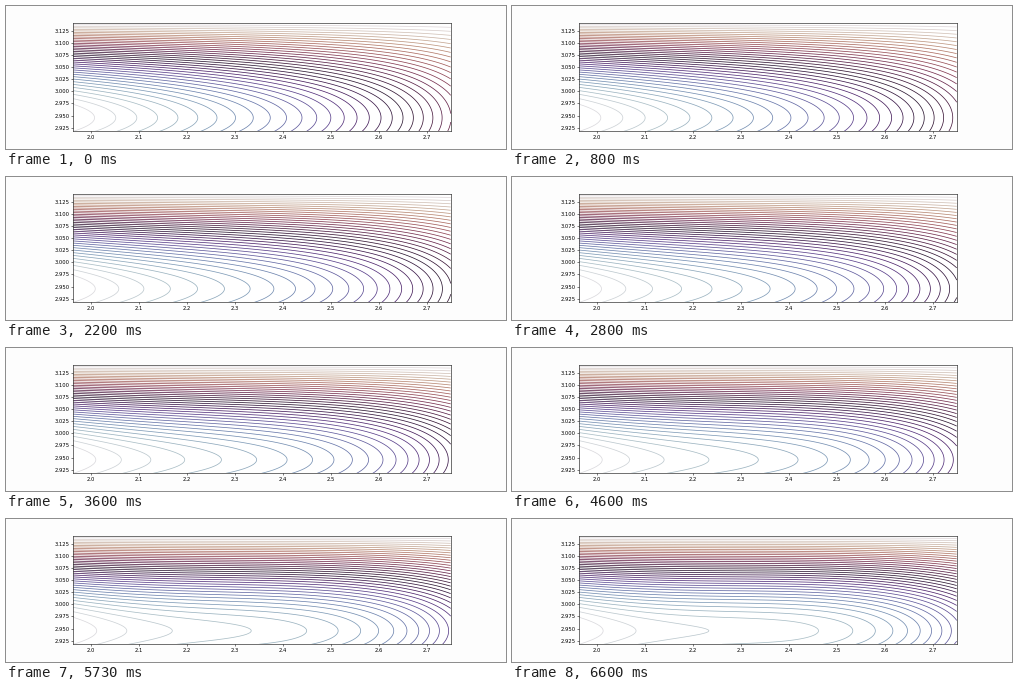
A matplotlib script that plays this animation: 500x143 px, repeating every 6.67 s.

```python
import numpy as np
import matplotlib.pyplot as plt
from matplotlib.animation import FuncAnimation

W, H, DPI = 500, 143, 64
FRAMES, LOOP = 100, 6670
PX = 72 / DPI  # points per pixel
LEVELS = 40

X0, X1 = 5 * np.pi / 8, 7 * np.pi / 8
Y0, Y1 = 13 * np.pi / 14, np.pi
BOX = (67.3, 17.7, 377.4, 108.0)  # left, bottom, width, height in pixels

x = np.linspace(X0, X1, 240)
y = np.linspace(Y0, Y1, 120)
v = (x - X0) / (X1 - X0)
wave = np.sin(8 * y)[:, None]  # trough of -1, back to 0 at pi

# slightly muted cyclic colours, one per level
heights = np.linspace(0, 1, LEVELS + 1)
rgb = plt.get_cmap("twilight")(heights)[:, :3]
grey = rgb @ [[0.3], [0.59], [0.11]]
colors = 0.75 * rgb + 0.25 * grey


def surface(t):
    """Valley along x that flattens in the middle as t goes from 0 to 1."""
    rise = 0.047 * v + 0.067 * v**3.5 / 3.5
    dip = 0.052 * t * (1 - np.cos(np.pi * v)) / np.pi
    floor = (rise - dip) * BOX[2] / LEVELS
    return 1 + (1 - floor) * wave


fig = plt.figure(figsize=(W / DPI, H / DPI), dpi=DPI, facecolor="#fdfdfd")
ax = fig.add_axes([BOX[0] / W, BOX[1] / H, BOX[2] / W, BOX[3] / H])
ax.set_xlim(X0, X1)
ax.set_ylim(Y0, Y1)
ax.set_xticks(np.arange(2.0, 2.75, 0.1))
ax.set_yticks(np.arange(2.925, 3.13, 0.025))
ax.xaxis.set_major_formatter("{x:.1f}")
ax.yaxis.set_major_formatter("{x:.3f}")
ax.tick_params(labelsize=5.2 * PX, length=1.8 * PX, width=0.5 * PX, pad=1.6 * PX)
for spine in ax.spines.values():
    spine.set_linewidth(0.55 * PX)

lines = None


def draw(i):
    global lines
    if lines is not None:
        lines.remove()
    lines = ax.contour(x, y, surface(i / (FRAMES - 1)), levels=heights,
                       colors=colors, linewidths=0.75 * PX)
    return [lines]


anim = FuncAnimation(fig, draw, frames=FRAMES, init_func=lambda: draw(0),
                     interval=LOOP / FRAMES, repeat=True, repeat_delay=0)
plt.show()
```
